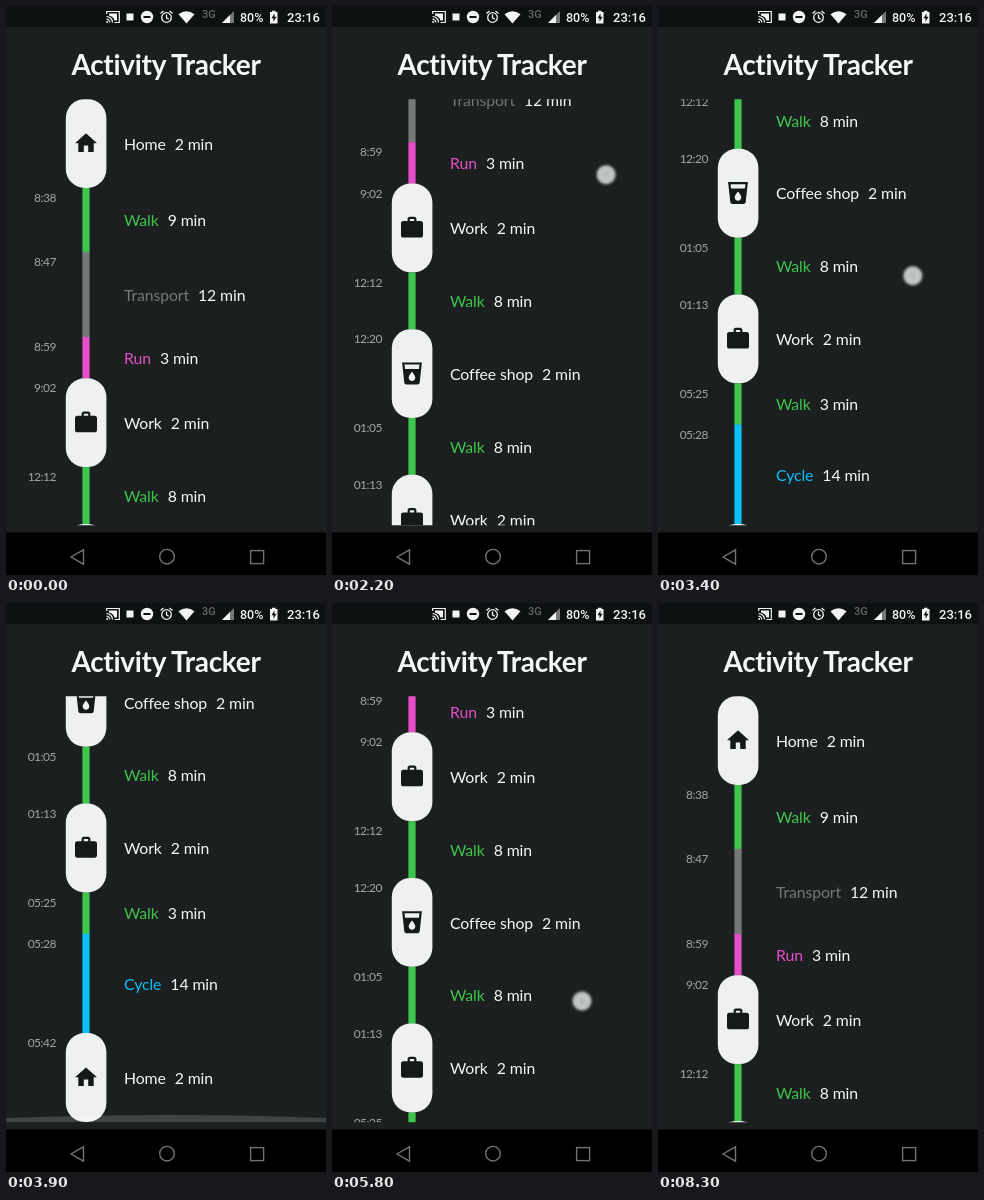
These frames come from a looping animation (320 px wide and 569 px high, 8600 ms). An HTML page:

```html
<!DOCTYPE html>
<html lang="en">
<head>
<meta charset="utf-8">
<title>Activity Tracker</title>
<style>
html, body { margin: 0; width: 100%; height: 100%; overflow: hidden; background: #1b1f1f; }
svg { display: block; width: 100vw; height: 100vh; }
text { font-family: Lato, "Open Sans", sans-serif; fill: #f6f8f7; }
.title { font-size: 28px; font-weight: 700; letter-spacing: -.3px; text-anchor: middle; }
.item { font-size: 15.8px; letter-spacing: -.1px; }
.time { font-size: 12px; letter-spacing: -.5px; text-anchor: end; fill: #a2a5a4; }
.status { font: 500 13px Roboto, sans-serif; fill: #f4f4f4; }
</style>
</head>
<body>
<svg viewBox="0 0 320 569">
  <defs>
    <clipPath id="view"><rect y="93.3" width="320" height="426"/></clipPath>
    <radialGradient id="dot">
      <stop offset="0" stop-color="#b6b9b9"/>
      <stop offset=".45" stop-color="#c6c8c8"/>
      <stop offset=".64" stop-color="#b0b3b3"/>
      <stop offset=".76" stop-color="#626666"/>
      <stop offset="1" stop-color="#1b1f1f" stop-opacity="0"/>
    </radialGradient>
  </defs>
  <rect width="320" height="569" fill="#1b1f1f"/>
  <g clip-path="url(#view)">
    <g id="list"></g>
    <path id="topGlow" fill="#fff"/>
    <path id="endGlow" fill="#fff"/>
  </g>
  <text class="title" x="160" y="69">Activity Tracker</text>

  <rect width="320" height="21" fill="#0e1112"/>
  <g fill="#f4f4f4">
    <path d="M100.7 8V5.5H113.3V16.5H108.5M100.5 10.5a6 6 0 0 1 6 6M100.5 13.2a3.3 3.3 0 0 1 3.3 3.3" fill="none" stroke="#f4f4f4" stroke-width="1.2"/>
    <path d="M103 7.5h8v7h-2.500q-1-4-5.500-5z"/>
    <circle cx="101.2" cy="16" r="1"/>
    <rect x="120.5" y="7.5" width="7" height="7"/>
    <circle cx="141" cy="11" r="6.2"/>
    <rect x="137.5" y="10" width="7" height="2" fill="#0e1112"/>
    <g fill="none" stroke="#f4f4f4" stroke-width="1.3">
      <circle cx="160.5" cy="11.5" r="4.8"/>
      <path d="M160.5 8.5v3.3l2.3 1.5M154.5 7.5l3-2.5M166.5 7.5l-3-2.5"/>
    </g>
    <path d="M172.5 8.2Q180.5 2.5 188.5 8.2L180.5 17.5z"/>
    <path d="M228 5V17H216z" fill="#777"/>
    <path d="M224 9V17H216z"/>
    <path d="M264 6h2V4.8h3.5V6h2v11.5h-7.5z"/>
    <path d="M268.5 7.5l-3 4.7h2v3.5l3-4.9h-2z" fill="#0e1112"/>
  </g>
  <text class="status" x="196" y="11.5" style="font-size:11px;fill:#676767">3G</text>
  <text class="status" x="234" y="15.5" style="font-size:12.5px">80%</text>
  <text class="status" x="281" y="15.5">23:16</text>

  <rect y="526.5" width="320" height="43" fill="#000"/>
  <g fill="none" stroke="#727272" stroke-width="1.4">
    <path d="M65 551L77.5 543.8V558.2z"/>
    <circle cx="161" cy="550.7" r="7.3"/>
    <rect x="244.6" y="544.6" width="13" height="13"/>
  </g>
  <circle id="touch" r="12.5" fill="url(#dot)"/>
</svg>
<script>
const $ = id => document.getElementById(id);
const clamp = (v, lo = 0, hi = 1) => Math.min(hi, Math.max(lo, v));
const LOOP = 8600, STEP = 100, TOP = 93, END = 519.3;
const PILL = 88.9, PER_MIN = 7.1, MAX = 463;

const icons = {
  Home: 'M10 20v-6h4v6h5v-8h3L12 3 2 12h3v8z',
  Work: 'M20 6h-4V4c0-1.1-.9-2-2-2h-4c-1.1 0-2 .9-2 2v2H4c-1.1 0-2 .9-2 2v11c0 1.1.9 2 2 2h16c1.1 0 2-.9 2-2V8c0-1.1-.9-2-2-2zm-6 0h-4V4h4v2z',
  'Coffee shop': 'M3 2l2 18.2C5.1 21.2 6 22 7 22h10c1 0 1.9-.8 2-1.8L21 2H3zm9 17c-1.7 0-3-1.3-3-3 0-2 3-5.4 3-5.4s3 3.4 3 5.4c0 1.7-1.3 3-3 3zm6.3-11H5.7l-.5-4h13.6z'
};
const colors = { Walk: '#3ec54c', Transport: '#767878', Run: '#e44fc9', Cycle: '#0cbff9' };

// start time, activity, minutes
const items = `,Home,2 8:38,Walk,9 8:47,Transport,12 8:59,Run,3 9:02,Work,2 12:12,Walk,8 12:20,Coffee_shop,2
  01:05,Walk,8 01:13,Work,2 05:25,Walk,3 05:28,Cycle,14 05:42,Home,2`
  .split(/\s+/).map(item => item.replace('_', ' ').split(','));

let y = TOP, lines = '', pills = '', labels = '';
for (const [time, name, min] of items) {
  const icon = icons[name], h = icon ? PILL : Math.max(5.8, min) * PER_MIN, mid = y + h / 2;
  if (icon) {
    pills += `<rect x="59.8" y="${y}" width="40.6" height="${h}" rx="19" fill="#eff1f0"/>
      <path d="${icon}" transform="translate(66.8 ${mid - 13.4}) scale(1.1)" fill="#151918"/>`;
  } else {
    lines += `<rect x="76.4" y="${y}" width="7.2" height="${h + .3}" fill="${colors[name]}"/>`;
  }
  labels += `<text class="time" x="50" y="${y + 14.2}">${time}</text>
    <text class="item" x="118" y="${mid + 6.3}"><tspan style="fill:${colors[name] || ''}">${name}</tspan><tspan dx="9">${min} min</tspan></text>`;
  y += h;
}
$('list').innerHTML = lines + pills + labels;

// The finger speeds up along a straight line: progress ** power
const swipes = [
  { start: 1300, time: 1000, from: [246, 390], to: [279, 130], power: 1.53 },
  { start: 3100, time: 500, from: [248, 330], to: [270, 135], power: 2.3 },
  { start: 5200, time: 600, from: [269, 148], to: [250, 398], power: 2.75 }
];
const GRIP = .88, FLING = 800;

// Dragged distance, then a fling that keeps the release speed and eases out
function moved({ start, time, from, to, power }, t) {
  const drag = GRIP * (from[1] - to[1]);
  const fling = drag * power / time * FLING / 3;
  const p = clamp((t - start) / time), q = clamp((t - start - time) / FLING);
  return drag * p ** power + fling * (1 - (1 - q) ** 3);
}

// Edge glow: swells for 200 ms, then recedes for 500 ms
function glow(path, edge, dir, age) {
  const swell = 1 - (1 - clamp(age / 200)) ** 2;
  const fade = (1 - clamp((age - 200) / 500)) ** 2;
  const h = 16 * swell * fade * dir;
  path.setAttribute('d', `M0 ${edge}H320V${edge + h * .57}Q160 ${edge + h * 1.43} 0 ${edge + h * .57}z`);
  path.setAttribute('opacity', .24 * Math.sqrt(fade));
}

const begin = performance.now();
function draw() {
  const t = Math.floor((performance.now() - begin) % LOOP / STEP) * STEP;
  const scroll = swipes.reduce((pos, s) => clamp(pos + moved(s, t), 0, MAX), 0);
  $('list').setAttribute('transform', `translate(0 ${-scroll})`);
  glow($('endGlow'), END, -1, t - 3540);
  glow($('topGlow'), TOP, 1, t - 6250);

  const s = swipes.find(s => t >= s.start && t <= s.start + s.time);
  $('touch').style.display = s ? '' : 'none';
  if (s) {
    const p = ((t - s.start) / s.time) ** s.power;
    const [x, y] = s.from.map((v, i) => v + (s.to[i] - v) * p);
    $('touch').setAttribute('transform', `translate(${x} ${y})`);
  }
  requestAnimationFrame(draw);
}
draw();
</script>
</body>
</html>
```
